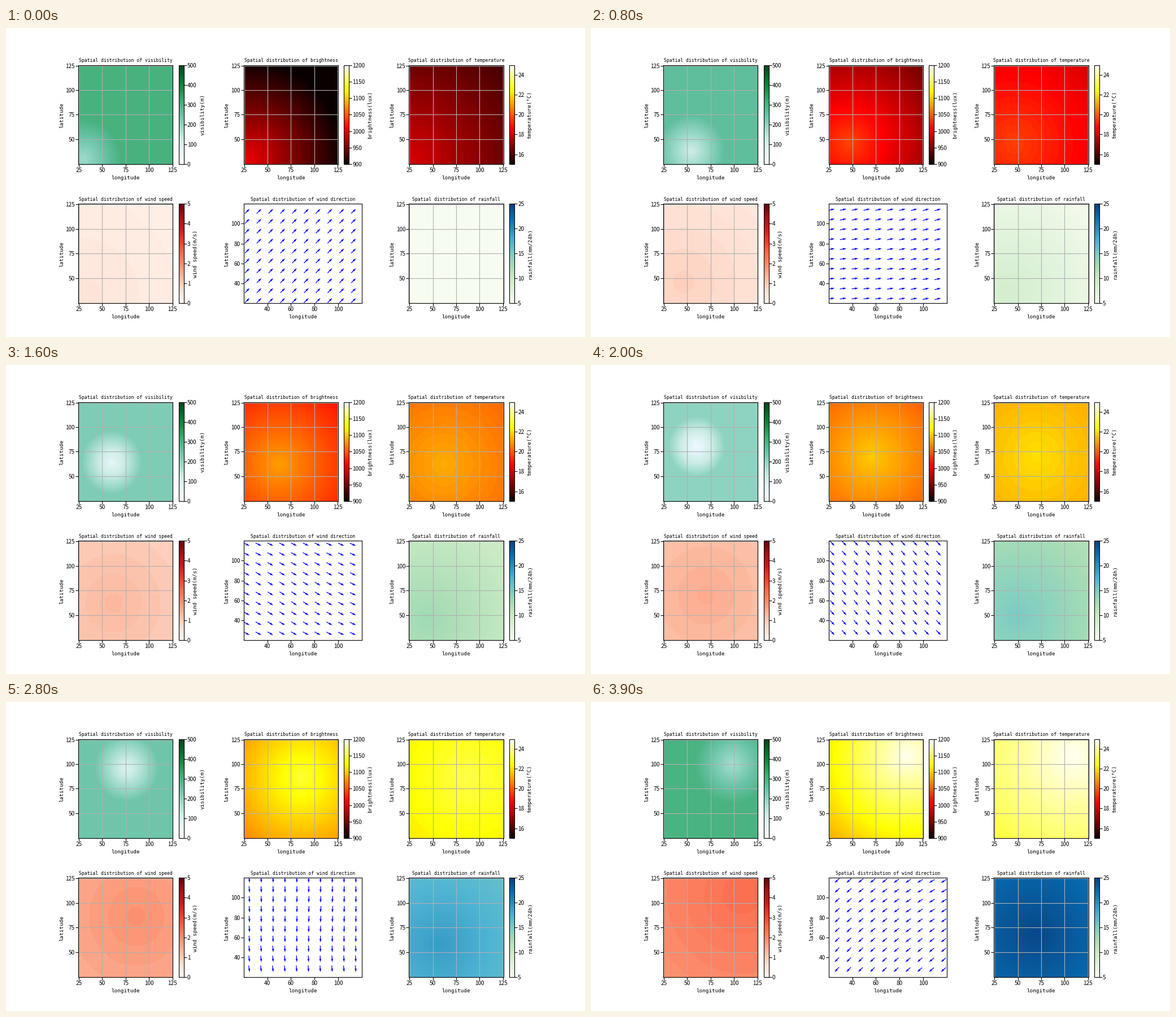
These frames come from a looping animation (1025 by 547 pixels, 4 s). A matplotlib script:

```python
import numpy as np
import matplotlib.pyplot as plt
from matplotlib.animation import FuncAnimation

W, H, DPI = 1025, 547, 100
FRAMES, INTERVAL = 40, 100
LABEL_SIZE, TITLE_SIZE, TICK_SIZE = 6.65, 5.82, 7.2

plt.rcParams["font.family"] = ["DejaVu Sans Mono", "Noto Sans CJK JP"]

fig, axes = plt.subplots(2, 3, figsize=(W / DPI, H / DPI), dpi=DPI)
fig.subplots_adjust(left=0.125, right=0.9, bottom=0.11, top=0.88,
                    wspace=0.4, hspace=0.4)

grid = np.arange(25, 126)
GX, GY = np.meshgrid(grid, grid)
QX, QY = np.meshgrid(np.arange(25, 116, 10), np.arange(25, 116, 10))


def distance(cx, cy, x=GX, y=GY):
    return np.hypot(x - cx, y - cy)


def visibility(k):
    """Foggy patch that wanders between waypoints and thickens at mid-loop."""
    steps = [0, 10, 20, 30, 40]
    cx = np.interp(k, steps, [30, 60, 60, 80, 100])
    cy = np.interp(k, steps, [30, 40, 80, 100, 100])
    u = abs(20 - k)
    outside, centre, radius = 200 + 5 * u, 30 + 7.5 * u, 30 + 0.5 * u
    share = np.minimum(distance(cx, cy) / radius, 1)
    return centre + (outside - centre) * share


def diagonal(k):
    return distance(30 + 2 * k, 30 + 2 * k)


def brightness(k):
    slope = np.interp(k, [0, 20, 30, 40], [1, 0.62, 0.85, 0.93])
    return 1000 + 5 * k - slope * diagonal(k)


def temperature(k):
    peak = np.interp(k, [0, 20, 40], [18, 22, 25])
    slope = 0.01 + 0.0003 * abs(20 - k)
    return np.round(peak - slope * diagonal(k), 1)


def wind_speed(k):
    slope = min(0.005, 0.0025 + 0.00025 * k)
    return np.round(0.5 + 0.05 * k - slope * diagonal(k), 1)


def rainfall(k):
    return 5 + 0.5 * k - 0.03 * distance(30 + k, 30 + k)


def wind_vectors(k):
    spread = min(0.15, 0.015 * k)
    d = distance(30 + 2 * k, 30 + 2 * k, QX, QY)
    angle = np.radians(45 - 5 * k + spread * d)
    return np.cos(angle), np.sin(angle)


def pixel_label(x, y, text, rotation=0):
    fig.text(x / W, 1 - y / H, text, size=LABEL_SIZE, rotation=rotation,
             ha="center", va="center")


def style_ticks(ax):
    ax.tick_params(labelsize=TICK_SIZE, pad=1,
                   labelfontfamily="Noto Sans CJK JP")


def decorate(ax, name):
    box = ax.get_position()
    left, bottom = box.x0 * W, (1 - box.y0) * H
    mid_x = (box.x0 + box.x1) / 2 * W
    mid_y = (1 - (box.y0 + box.y1) / 2) * H
    ax.set_title(f"Spatial distribution of {name}", fontsize=TITLE_SIZE, pad=4.2)
    style_ticks(ax)
    pixel_label(mid_x, bottom + 24.4, "longitude")
    pixel_label(left - 29.5, mid_y + 1, "latitude", 90)
    return mid_y


# axes, name, unit, colormap, colorbar ticks, colorbar label x, field
PANELS = [
    (axes[0, 0], "visibility", "(m)", "BuGn", range(0, 501, 100), 348, visibility),
    (axes[0, 1], "brightness", "(lux)", "hot", range(900, 1201, 50), 645, brightness),
    (axes[0, 2], "temperature", "(°C)", "hot", range(16, 25, 2), 927, temperature),
    (axes[1, 0], "wind speed", "(m/s)", "Reds", range(0, 6), 336, wind_speed),
    (axes[1, 2], "rainfall", "(mm/24h)", "GnBu", range(5, 26, 5), 928, rainfall),
]
LIMITS = {"temperature": (15, 25)}

maps = []
for ax, name, unit, cmap, ticks, label_x, field in PANELS:
    low, high = LIMITS.get(name, (ticks[0], ticks[-1]))
    image = ax.imshow(field(0), cmap=cmap, vmin=low, vmax=high, origin="lower",
                      extent=(24.5, 125.5, 24.5, 125.5), aspect="auto",
                      interpolation="nearest")
    bar = fig.colorbar(image, ax=ax, ticks=list(ticks))
    style_ticks(bar.ax)
    ax.set_xticks(range(25, 126, 25))
    ax.set_yticks(range(50, 126, 25))
    ax.grid(True)
    mid_y = decorate(ax, name)
    pixel_label(label_x, mid_y + 0.5, name + unit, 90)
    maps.append((image, field))

wind_ax = axes[1, 1]
arrows = wind_ax.quiver(QX, QY, *wind_vectors(0), color="blue", pivot="tip",
                        scale=18, width=0.006)
wind_ax.set(xlim=(20, 120), ylim=(20, 120),
            xticks=range(40, 101, 20), yticks=range(40, 101, 20))
decorate(wind_ax, "wind direction")


def update(k):
    for image, field in maps:
        image.set_data(field(k))
    arrows.set_UVC(*wind_vectors(k))
    return [image for image, _ in maps] + [arrows]


anim = FuncAnimation(fig, update, frames=FRAMES, interval=INTERVAL,
                     repeat=True, repeat_delay=0, blit=False)
plt.show()
```
